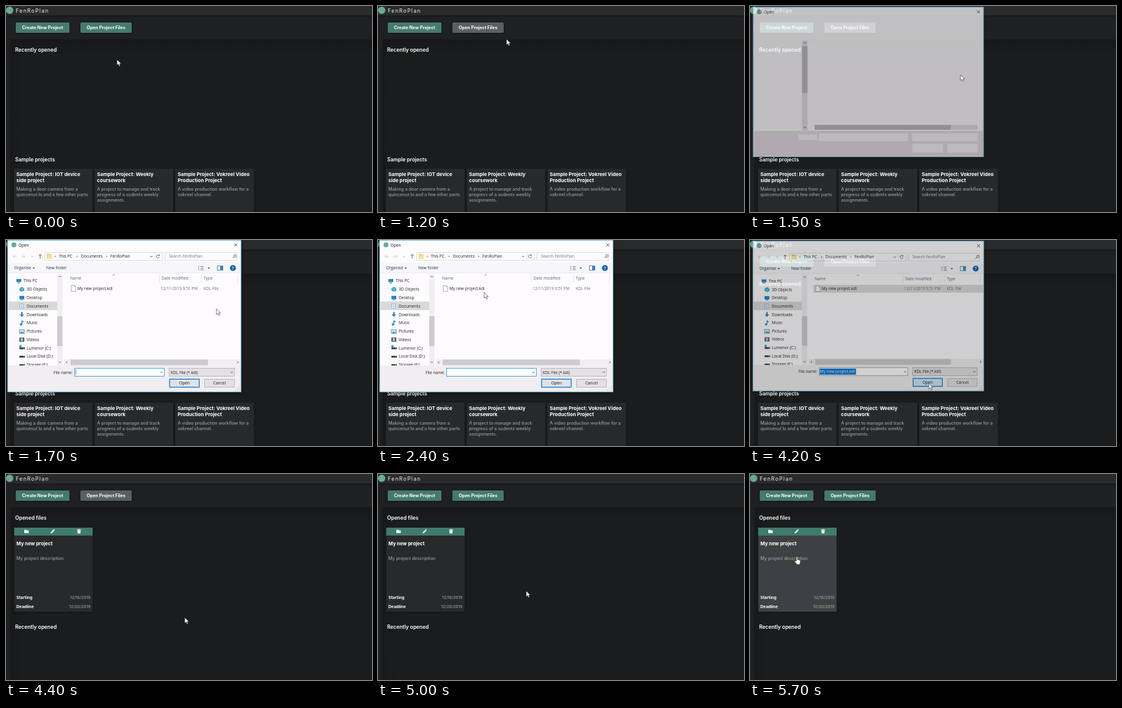
An HTML page that plays this animation: 600x338 px, repeating every 5800 ms.

```html
<!DOCTYPE html>
<html lang="en">
<head>
<meta charset="utf-8">
<title>Opening a project</title>
<style>
html, body { margin: 0; width: 100%; height: 100%; overflow: hidden; background: #1c1d1e; }
svg { display: block; width: 600px; height: 338px; }
text { white-space: pre; }
.ui { font-family: Inter, "Open Sans", sans-serif; }
.win { font-family: "Open Sans", "Noto Sans", sans-serif; font-size: 6.6px; }
</style>
</head>
<body>
<svg id="stage" viewBox="0 0 600 338" xmlns="http://www.w3.org/2000/svg"></svg>
<script>
const LOOP = 5800, STEP = 100;
const APP = 'FenRoPlan';
const GREEN = '#457a6b', GREY = '#5a6062', CARD = '#28292b', CARD_HOVER = '#3e4144';
const PAPER = '#fdfbfd', PANEL = '#f0eef0', MUTED = '#9c9d9e';

const rect = (x, y, w, h, fill, extra = '') =>
  `<rect x="${x}" y="${y}" width="${w}" height="${h}" fill="${fill}" ${extra}/>`;
const line = (d, color, w = 1, extra = '') =>
  `<path d="${d}" fill="none" stroke="${color}" stroke-width="${w}" ${extra}/>`;
const shape = (d, fill, extra = '') => `<path d="${d}" fill="${fill}" ${extra}/>`;
const dot = (x, y, r, fill) => `<circle cx="${x}" cy="${y}" r="${r}" fill="${fill}"/>`;
const text = (x, y, s, fill, extra = '') => `<text x="${x}" y="${y}" fill="${fill}" ${extra}>${s}</text>`;
const ui = (x, y, s, size, weight, fill = '#fff', extra = '') =>
  text(x, y, s, fill, `font-size="${size}" font-weight="${weight}" ${extra}`);
const win = (x, y, s, fill = '#222', extra = '') => text(x, y, s, fill, extra);
const box = (x, y, w, h, fill, stroke, extra = '') =>
  rect(x + .5, y + .5, w - 1, h - 1, fill, `stroke="${stroke}" ${extra}`);
const group = (id, body, extra = '') => `<g id="${id}" ${extra}>${body}</g>`;
const chevron = (x, y, dir, color = '#444', r = 1.8) =>
  line(`M${-r} ${-r / 2}L0 ${r / 2}L${r} ${-r / 2}`, color, .9,
    `transform="translate(${x} ${y}) rotate(${{ down: 0, left: 90, up: 180, right: 270 }[dir]})"`);

// Home screen
const button = (x, w, label, id) =>
  rect(x, 27, w, 17, GREEN, `rx="1.5" id="${id}" filter="url(#soft)"`) +
  ui(x + w / 2, 38.2, label, 7.2, 700, '#fff', 'text-anchor="middle"');

function sampleCard(x, title, lines) {
  return rect(x, 267, 129, 80, CARD, 'filter="url(#soft)"') +
    title.map((s, i) => ui(x + 4, 279.3 + i * 10, s, 8, 700)).join('') +
    lines.map((s, i) => ui(x + 4, 302.6 + i * 9.4, s, 7.2, 500, MUTED)).join('');
}

const frameHtml =
  rect(0, 0, 600, 338, '#1e2021') +
  rect(8, 55, 600, 300, '#1b1c1d', 'filter="url(#soft)"') +
  rect(8, 55, 600, 283, 'url(#edgeTop)') + rect(8, 55, 24, 283, 'url(#edgeLeft)') +
  rect(0, 0, 600, 15.5, '#292a2c', 'filter="url(#soft)"') +
  dot(6, 7, 6, '#68aa9a') +
  ui(16, 10.8, APP, 8.6, 400, '#f2f2f2', 'letter-spacing="1.32"') +
  button(16, 88, 'Create New Project', 'create') +
  button(122, 84, 'Open Project Files', 'openFiles');

const beforeHtml =
  ui(15, 75.3, 'Recently opened', 8.4, 600) +
  ui(15, 255, 'Sample projects', 8.4, 600) +
  sampleCard(13, ['Sample Project: IOT device', 'side project'],
    ['Making a door camera from a', 'quincenut lo and a few other parts']) +
  sampleCard(145.3, ['Sample Project: Weekly', 'coursework'],
    ['A project to manage and track', 'progress of a sudents weekly', 'assignments.']) +
  sampleCard(277.5, ['Sample Project: Vokreel Video', 'Production Project'],
    ['A video production workflow for a', 'vokreel channel.']);

const dateRow = (y, label, date) =>
  ui(17, y, label, 6.7, 700) + ui(138.3, y, date, 6.5, 500, MUTED, 'text-anchor="end"');

const afterHtml =
  ui(15, 75.3, 'Opened files', 8.4, 600) +
  rect(13.5, 88, 128.5, 138, CARD, 'id="card" filter="url(#soft)"') +
  rect(13.5, 88, 128.5, 13, '#407b6b') +
  shape('M30 91.5h3l1 1h3.2v4.5h-7.2z', '#fff') +
  shape('M73 97.5l.5-2 4-4 1.6 1.6-4 4zM78 91l.8-.7 1.5 1.5-.7.8z', '#fff') +
  shape('M116.5 91h2l.5-.6h1.4l.5.6h2v1h-6.4zM117 92.6h5.4l-.4 4.9h-4.6z', '#fff') +
  ui(17, 117, 'My new project', 7.9, 700) +
  ui(17, 140.6, 'My project description', 7.2, 500, MUTED) +
  dateRow(204.5, 'Starting', '12/18/2019') +
  dateRow(219.5, 'Deadline', '12/20/2019') +
  ui(15, 254.2, 'Recently opened', 8.4, 600);

// File dialog
const shellHtml =
  rect(2.5, 0, 383, 249.5, PAPER, 'filter="url(#deep)"') +
  rect(3, 206, 382, 43, PANEL) +
  rect(2.8, .4, 382.4, 248.8, 'none', 'stroke="#3f9dbd" stroke-width=".7"') +
  dot(13, 8, 4, '#68aa9a') + win(20.5, 10.8, 'Open', '#111') +
  line('M374.2 5.7l5 5m0-5l-5 5', '#222', .8);

const skeletonHtml =
  rect(4, 206, 380, 42, '#e6dfe5') +
  rect(84, 56, 9, 149, '#e4dfe4') + rect(84, 65, 9, 78, '#bdbbbd') +
  chevron(88.5, 60, 'up') + chevron(88.5, 200, 'down') +
  rect(105, 196, 270, 8, '#e4dfe4') + rect(105, 196, 226, 8, '#bdbbbd') +
  [[78, 212, 31, 9], [112, 210, 148, 13], [267, 210, 108, 13], [267, 227, 51, 15], [325, 227, 50, 15]]
    .map(b => rect(...b, '#f8f5f8')).join('');

const sideItems = [
  ['3D Objects', '#35a6c4'], ['Desktop', '#1c86d1'], ['Documents', '#8fb7d3'], ['Downloads', '#2783d0'],
  ['Music', '#2387d8'], ['Pictures', '#5e94ab'], ['Videos', '#4f5963'],
  ['Lumenor (C:)', ''], ['Local Disk (D:)', ''], ['Storage (E:)', '']
];
const icons = [
  (y, c) => shape(`M22 ${y - 2}l4-2 4 2v4l-4 2-4-2z`, c) + line(`M22 ${y - 2}l4 2 4-2m-4 2v4`, '#c6eaf2', .6),
  (y, c) => rect(22, y - 3, 8, 5.5, c) + rect(24, y + 3, 4, 1, c),
  (y, c) => box(22, y - 4, 7, 8, '#fff', c) + line(`M24 ${y - 1.5}h3m-3 1.5h3m-3 1.5h3`, '#3e86b5', .6),
  (y, c) => shape(`M24.8 ${y - 4}h2.4v4h2.6l-3.8 4-3.8-4h2.6z`, c),
  (y, c) => line(`M26 ${y + 2.5}V${y - 4}q.5 2 3 2.5`, c, 1.3) + dot(24.5, y + 2.5, 1.9, c),
  (y, c) => box(21.5, y - 3, 9, 7, '#dcecf2', c) + shape(`M22.5 ${y + 3}l2.5-3 2 1.5 1-1 2 2.5z`, c),
  (y, c) => rect(22, y - 3.5, 8, 7, c) + rect(24, y - 2.5, 4, 5, '#9ac2da')
];
const drive = y => rect(22, y, 9, 3, '#3c4146') + rect(28.5, y + 1, 1.5, 1, '#77e077');

const sidebarHtml =
  rect(4, 101, 80, 14, '#d9d9d9') +
  rect(17, 64, 8, 5, '#2a8cc0') + rect(19, 70, 4, 1, '#556') +
  win(29, 69.4, 'This PC') +
  sideItems.map(([name, color], i) => {
    const y = 81 + i * 13.75;
    return (icons[i] ? icons[i](y, color) : drive(y - 1)) + win(34, y + 2.4, name);
  }).join('') +
  rect(22, 172.5, 3.5, 3.5, '#1c9be0') +
  rect(84, 56, 8.5, 150, PANEL) + rect(84, 125, 8.5, 49, '#cdcbcd') +
  chevron(88.3, 60, 'up') + chevron(88.3, 200.5, 'down');

const barHtml =
  line('M17.5 27h-6m2.5-2.5l-2.5 2.5 2.5 2.5M25 27h6m-2.5-2.5l2.5 2.5-2.5 2.5', '#c3c3c3', .8) +
  chevron(43, 27, 'down', '#aaa', 1.5) +
  line('M56 30.5v-7m-2.6 2.6l2.6-2.6 2.6 2.6', '#555', .9) +
  box(63, 20, 194, 14, PAPER, '#dedcde') +
  shape('M67 22.5h4l1 1.2h3v7h-8z', '#f2cf63') + rect(68, 25, 7, 5.7, '#fae08e') +
  [80.5, 116.5, 165].map(x => chevron(x, 27, 'right', '#555', 1.4)).join('') +
  win(86.5, 29.4, 'This PC') + win(123, 29.4, 'Documents') + win(171, 29.4, APP) +
  chevron(238, 27, 'down') + line('M244.5 21V33', '#ddd', .7) +
  line('M251.4 25.6a2.6 2.6 0 1 0 .2 2.3m-.2-4.3v2.2h-2', '#555', .8) +
  box(260, 20, 119, 14, PAPER, '#dedcde') + win(267, 29.4, 'Search ' + APP, '#777') +
  line('M371.5 29.8l2.4-2.4a2 2 0 1 1 .3.3', '#444', .9) +
  rect(4, 37, 380, 17, '#f6f6f9') + line('M4 54H384', '#e4e6e8', .8) +
  win(13.5, 48.4, 'Organise', '#1d3354') + shape('M43.5 45.2h4l-2 2.2z', '#445') +
  win(66, 48.4, 'New folder', '#1d3354') +
  line('M315 43.5h2m-2 2.7h2m-2 2.7h2M319 43.5h5m-5 2.7h5m-5 2.7h5', '#6d7f91', 1) +
  shape('M330.5 45.2h4l-2 2.2z', '#445') +
  box(346, 42, 10, 8, '#fff', '#5c7fa0') + rect(351, 43, 4, 6, '#2f86d2') +
  dot(372, 46, 4.8, '#0e62b5') +
  win(372, 48.5, '?', '#fff', 'text-anchor="middle" font-weight="700"');

const listHtml =
  group('row', box(103, 73, 282, 13, '#cce8ff', '#99d1ff', 'id="rowBox" stroke-width=".7"')) +
  win(105, 65, 'Name', '#56657c') + win(255, 65, 'Date modified', '#56657c') + win(324, 65, 'Type', '#56657c') +
  chevron(176.5, 57.3, 'up', '#777', 2) +
  line('M251.5 56V70M320.5 56V70M379.5 56V70', '#e3e3e3', .8) +
  shape('M107 74.5h5l2 2v7.7h-7z', '#fff', 'stroke="#888" stroke-width=".7"') +
  line('M112 74.5v2h2', '#888', .6) +
  win(117, 81.8, 'My new project.kdl') +
  win(253.5, 81.8, '12/11/2019 9:51 PM', '#6d6d6d', 'font-size="6.5"') + win(324, 81.8, 'KDL File', '#6d6d6d') +
  rect(95, 196, 289, 9.5, PANEL) + rect(106, 196, 225, 9.5, '#cdcbcd') +
  chevron(99.5, 200.7, 'left') + chevron(380, 200.7, 'right');

const footHtml =
  rect(4, 206, 380, 42, PANEL) +
  win(109.5, 219.5, 'File name:', '#222', 'text-anchor="end"') +
  box(112, 210, 148, 14, '#fff', '#0078d7', 'id="field" stroke-width=".7"') +
  rect(113.5, 212, 60, 10, '#0078d7', 'id="mark"') +
  win(114, 219.5, 'My new project.kdl', '#222', 'id="fileName"') +
  line('M114.5 212.5V221.5', '#222', .6, 'id="caret"') +
  chevron(255, 217, 'down') +
  box(267, 210, 108, 14, '#e3e1e3', '#adadad', 'stroke-width=".8"') +
  win(270, 219.5, 'KDL File (*.kdl)') + chevron(370, 217, 'down') +
  rect(268.3, 228.3, 48.4, 13.2, '#e3e1e3', 'stroke="#0078d7" stroke-width="1.3" id="okBox"') +
  win(292.5, 237.4, 'Open', '#111', 'text-anchor="middle"') +
  box(325, 228, 50, 14, '#e3e1e3', '#adadad', 'stroke-width=".8"') +
  win(350, 237.4, 'Cancel', '#222', 'text-anchor="middle"') +
  [[382, 241], [382, 244], [379, 244], [382, 247], [379, 247], [376, 247]]
    .map(([x, y]) => rect(x - .5, y - .8, 1.2, 1.2, '#b5b5b5')).join('');

const arrowHtml = shape('M0 0V9.3L2.2 7.3 3.8 10.8 5.4 10.1 3.9 6.7H6.8Z', '#fff',
  'stroke="#222" stroke-width=".6" stroke-linejoin="round"');
const handHtml = shape('M-1 0.8Q0-.8 1 .8V5L4.8 6Q6 6.5 5.7 8L4.8 11.8V13H-.8V11.8L-3.8 8Q-4.2 6.4-2.6 6.6L-1 8Z', '#fff',
  'stroke="#222" stroke-width=".6" stroke-linejoin="round"');

const fade = (id, dir, color, a) =>
  `<linearGradient id="${id}" ${dir}><stop stop-color="${color}" stop-opacity="${a}"/>` +
  `<stop offset="1" stop-color="${color}" stop-opacity="0"/></linearGradient>`;
const shadow = (id, dy, blur, a) =>
  `<filter id="${id}" x="-20%" y="-20%" width="140%" height="140%" color-interpolation-filters="sRGB">` +
  `<feDropShadow dx="0" dy="${dy}" stdDeviation="${blur}" flood-color="#000" flood-opacity="${a}"/></filter>`;

document.getElementById('stage').innerHTML =
  '<defs>' + shadow('soft', 1, 1.6, .4) + shadow('deep', 1, 2, .5) +
  fade('edgeTop', 'x2="0" y2=".08"', '#151617', .7) + fade('edgeLeft', 'x2="1"', '#171819', .7) + '</defs>' +
  group('home', frameHtml + group('before', beforeHtml) + group('after', afterHtml), 'class="ui"') +
  group('dialog', shellHtml + group('skeleton', skeletonHtml) +
    group('content', sidebarHtml + barHtml + listHtml + footHtml), 'class="win"') +
  group('cursor', group('arrow', arrowHtml) + group('hand', handHtml));

// Motion: [time, ...values]
const pointer = [
  [0, 182, 88], [100, 181, 84], [500, 166, 35], [1100, 166, 35], [1500, 345, 113], [1800, 345, 113],
  [2400, 174, 86], [2700, 172, 79], [3000, 238, 136], [3400, 307, 244], [3700, 293, 235],
  [4400, 293, 235.5], [4800, 243, 192], [5300, 243, 192], [5700, 77, 135.5]
];
const dialogPose = [   // opacity, scale
  [0, 0, .96], [1300, 0, .96], [1400, .35, .97], [1500, .73, .988], [1600, 1, 1],
  [4100, 1, 1], [4200, .8, .989], [4300, .25, .97], [4400, 0, .96]
];

function at(keys, t) {
  const i = keys.findIndex(k => k[0] > t);
  if (i < 0) return keys[keys.length - 1].slice(1);
  const a = keys[i - 1], b = keys[i], p = (t - a[0]) / (b[0] - a[0]);
  return a.slice(1).map((v, n) => v + (b[n + 1] - v) * p);
}

const $ = id => document.getElementById(id);
const show = (id, on) => { $(id).style.display = on ? '' : 'none'; };
const paint = (id, fill, stroke) => {
  $(id).setAttribute('fill', fill);
  if (stroke) $(id).setAttribute('stroke', stroke);
};

function render(t) {
  const within = (a, b) => t >= a && t < b;
  const opened = t >= 4400, picked = t >= 2600, closing = t >= 4000;
  show('before', !opened);
  show('after', opened);
  paint('openFiles', within(500, 4600) ? GREY : GREEN);
  const [x, y] = at(pointer, t);
  const onCard = opened && x < 142;
  paint('card', onCard ? CARD_HOVER : CARD);

  const [alpha, scale] = at(dialogPose, t);
  show('dialog', alpha > 0);
  $('dialog').setAttribute('opacity', alpha);
  $('dialog').setAttribute('transform', `translate(194 124.5) scale(${scale}) translate(-194 -124.5)`);
  show('skeleton', t < 1700);
  show('content', t >= 1700);

  show('row', picked);
  paint('rowBox', closing ? '#d9d9d9' : '#cce8ff', closing ? '#d0d0d0' : '#99d1ff');
  paint('field', '#fff', picked ? '#8a8a8a' : '#0078d7');
  show('fileName', picked);
  show('mark', closing);
  paint('fileName', closing ? '#fff' : '#222');
  show('caret', !picked && t % 1000 >= 500);
  paint('okBox', t >= 3600 ? '#cfe6f8' : '#e3e1e3');

  const hand = within(500, 1200) || onCard;
  show('hand', hand);
  show('arrow', !hand);
  $('cursor').setAttribute('transform', `translate(${x} ${y})`);
}

const start = performance.now();
function tick() {
  const t = (performance.now() - start) % LOOP;
  render(Math.floor(t / STEP) * STEP);
  requestAnimationFrame(tick);
}
tick();
</script>
</body>
</html>
```
